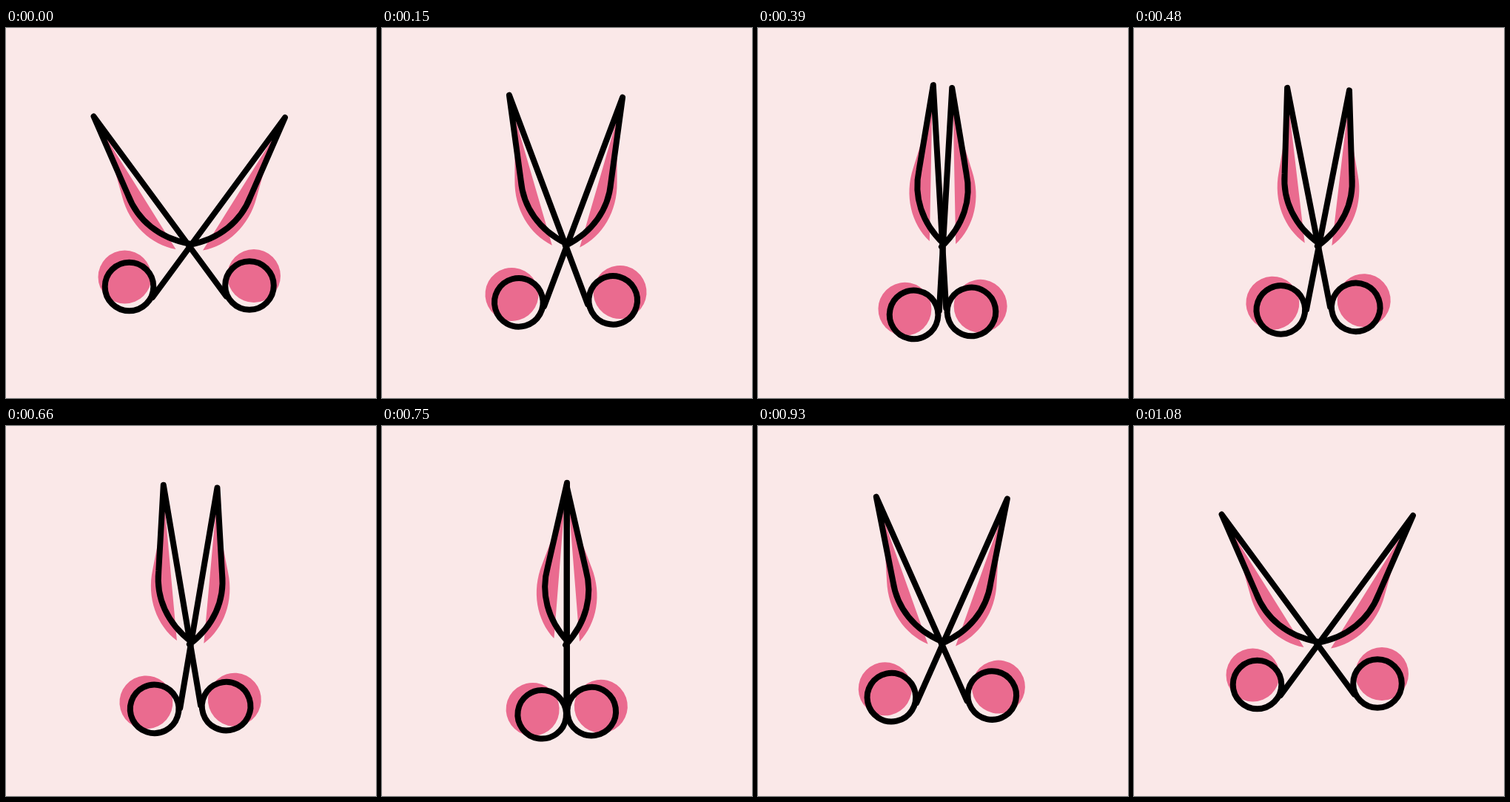
Recreate the animation shown at these times as an HTML page with a canvas. Size 500 by 500 pixels, loop 1110 ms.

```html
<!DOCTYPE html>
<html lang="en">
<head>
<meta charset="utf-8">
<title>Scissors</title>
<style>
html, body { margin: 0; width: 100%; height: 100%; overflow: hidden; background: #fae8e8; }
canvas { display: block; width: 500px; height: 500px; }
</style>
</head>
<body>
<canvas id="stage" width="500" height="500"></canvas>
<script>
const ctx = document.getElementById('stage').getContext('2d');
const LOOP = 1110, STEP = 30;
const OPEN = 36.5;
const LEFT = { x: 249, y: 297.5, dir: 1 };
const RIGHT = { x: 252.4, y: 294.3, dir: -1 };

// [step, opening angle in degrees, slope per step]
const KEYS = [
  [0, OPEN, 0], [5, 20.7, -4.4], [9, 3.5, -3.2], [10.6, 0, 0],
  [16, 11.2, 2.1], [18.7, 14.5, 0], [22, 9.7, -3], [25, 0, 0],
  [28, 11.5, 4], [36, OPEN, 0]
];

function angleAt(step) {
  const i = Math.max(1, KEYS.findIndex(k => k[0] >= step));
  const [t0, a, m0] = KEYS[i - 1], [t1, b, m1] = KEYS[i];
  const d = t1 - t0, u = (step - t0) / d, v = 1 - u;
  return a * v * v * (1 + 2 * u) + b * u * u * (1 + 2 * v)
    + d * u * v * (m0 * v - m1 * u);
}

function circle(x, y, r) {
  ctx.beginPath();
  ctx.arc(x, y, r, 0, Math.PI * 2);
}

function fills() {
  ctx.beginPath();
  ctx.moveTo(134, 146);
  ctx.lineTo(157, 228);
  ctx.bezierCurveTo(167, 266, 196, 293, 229.5, 299);
  ctx.closePath();
  ctx.fill();
  circle(335, 335, 36);
  ctx.fill();
}

function lines() {
  ctx.beginPath();
  ctx.moveTo(297.5, 362.5);
  ctx.lineTo(118.5, 119.5);
  ctx.lineTo(165, 226);
  ctx.bezierCurveTo(178, 260, 207, 284, 247.5, 291.5);
  ctx.stroke();
  circle(329, 348, 32.8);
  ctx.stroke();
}

// The right blade is a mirrored copy turning the other way.
function half(pivot, turn, paint) {
  ctx.save();
  ctx.translate(pivot.x, pivot.y);
  ctx.rotate(pivot.dir * turn);
  ctx.translate(-pivot.x, -pivot.y);
  if (pivot.dir < 0) {
    ctx.translate(495.5, 1.5);
    ctx.scale(-1, 1);
  }
  paint();
  ctx.restore();
}

function draw(ms) {
  const step = Math.floor((ms % LOOP) / STEP);
  const turn = (OPEN - angleAt(step)) * Math.PI / 180;
  ctx.fillStyle = '#fae8e8';
  ctx.fillRect(0, 0, 500, 500);
  ctx.fillStyle = '#ea6b8f';
  ctx.strokeStyle = '#000';
  ctx.lineWidth = 8;
  ctx.lineCap = ctx.lineJoin = 'round';
  for (const paint of [fills, lines]) {
    half(LEFT, turn, paint);
    half(RIGHT, turn, paint);
  }
}

const start = performance.now();
function tick() {
  draw(performance.now() - start);
  requestAnimationFrame(tick);
}
tick();
</script>
</body>
</html>
```
